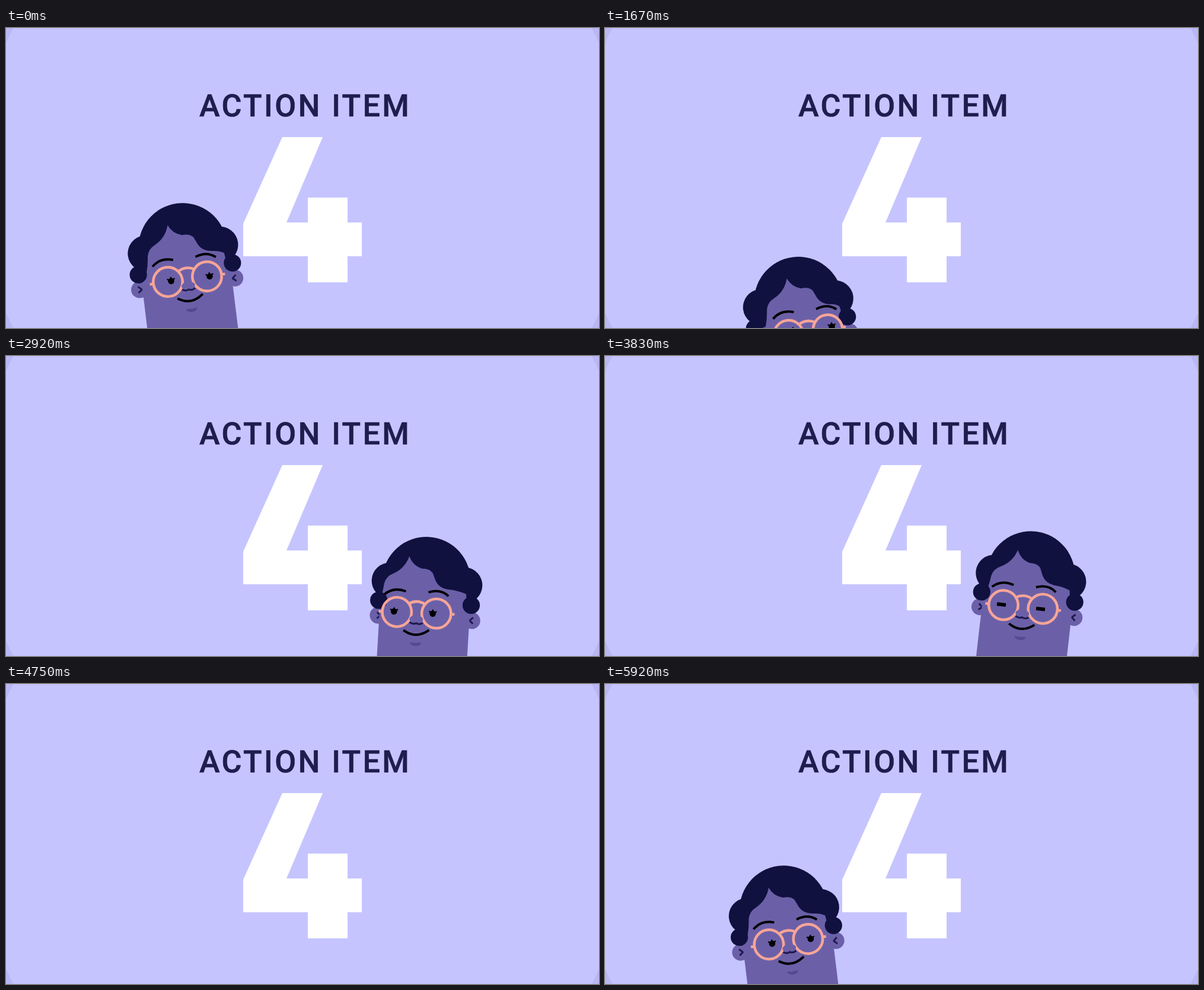
Write an HTML page that moves like this. It is 1000 px wide and 506 px high and loops after 6.01 s.

```html
<!DOCTYPE html>
<html lang="en">
<head>
<meta charset="utf-8">
<title>Action item 4</title>
<style>
  html, body { margin: 0; width: 100%; height: 100%; overflow: hidden; background: #bab8f3; }
  svg { display: block; width: 100vw; height: 100vh; }
  .title { font: 500 52px Roboto, sans-serif; letter-spacing: 3.4px; fill: #1f1d4e; stroke: #1f1d4e; stroke-width: .6; }
  .skin { fill: #6b60a8; }
  .hair { fill: #10113f; }
  .ink { fill: none; stroke: #000; stroke-width: 4; }
  .mark { fill: none; stroke: #1f1a50; stroke-width: 3; }
  .frame { fill: none; stroke: #f7a597; stroke-width: 4.5; }
</style>
</head>
<body>
<svg viewBox="0 0 1000 506">
  <circle cx="500" cy="253" r="549.3" fill="#c6c4ff"/>
  <text class="title" x="326" y="149">ACTION ITEM</text>
  <path role="img" aria-label="4" fill="#fff" d="M466 184H534L473 328H509V286H576V328H600V385H576V429H509V385H400V330Z"/>

  <g id="head">
    <g id="earL">
      <circle class="skin" cx="-81" cy="62.3" r="14.2"/>
      <path class="mark" d="M-83 57L-77 62.5L-83 67.5"/>
    </g>
    <g id="earR">
      <circle class="skin" cx="81" cy="62.3" r="14.2"/>
      <path class="mark" d="M83 57L77 62.5L83 67.5"/>
    </g>
    <g class="hair">
      <circle r="74.5"/>
      <g id="curls">
        <circle cx="-63" cy="3" r="30.5"/>
        <circle cx="63" cy="3.5" r="30.5"/>
      </g>
    </g>
    <path class="skin" d="M-76 37H76V330H-76Z"/>
    <path class="skin" id="forehead"/>
    <circle class="hair" id="bobL" cx="-80" cy="37" r="14.6"/>
    <circle class="hair" id="bobR" cx="80" cy="36.5" r="14.6"/>

    <g id="face">
      <path id="brows" class="ink" d="M-56 -28Q-41 -42 -20 -35M18 -35.5Q38 -43 52 -31"/>
      <g id="eyesOpen">
        <g id="eyeL"><circle r="5.3"/><path class="ink" style="stroke-width:2.2" d="M-6.5 -4L0 0L6.5 -4M0 0V-7"/></g>
        <g id="eyeR"><circle r="5.3"/><path class="ink" style="stroke-width:2.2" d="M-6.5 -4L0 0L6.5 -4M0 0V-7"/></g>
      </g>
      <path id="eyesShut" class="ink" style="stroke-width:6" d="M-40.7 0H-25.7M25.7 0H40.7"/>
      <g class="frame" transform="rotate(-1)">
        <circle cx="-33.3" r="24.7"/>
        <circle cx="33.3" r="24.7"/>
        <path d="M-14.5 -14.5Q0 -23.5 14.5 -14.5M-64 0H-58M58 0H64"/>
      </g>
      <ellipse class="skin" cy="11" rx="11.5" ry="6.5"/>
      <path class="mark" d="M-11 16.5Q-5 20.5 0 17.5Q6 20.5 11 16.5"/>
      <path id="mouth" class="ink"/>
      <path d="M-9 50Q1 51.5 11 49.5Q9 56 1 56Q-7 56 -9 50Z" fill="#544a92"/>
    </g>
  </g>
</svg>
<script>
const LOOP = 6010, STEP = 1000 / 12, LAST_STEP = 71;
const el = id => document.getElementById(id);
const move = (id, x, y = 0) => el(id).setAttribute('transform', `translate(${x} ${y})`);
const show = (id, on) => el(id).setAttribute('visibility', on ? 'inherit' : 'hidden');

// Smooth value through [time, value] keys.
function track(t, ...keys) {
  if (t <= keys[0][0]) return keys[0][1];
  for (let i = 1; i < keys.length; i++) {
    const [t0, a] = keys[i - 1], [t1, b] = keys[i];
    if (t <= t1) {
      const u = (t - t0) / (t1 - t0);
      return a + (b - a) * u * u * (3 - 2 * u);
    }
  }
  return keys.at(-1)[1];
}

const rise = (t, end) => 0.00117 * Math.max(0, end - t) ** 2;
const sink = (t, start, rate) => rate * Math.max(0, t - start) ** 3;

function leftPose(time) {
  const t = time > 5000 ? time - 6000 : time;
  const drop = rise(t, 14) * (t < 0) + sink(t, 1340, 2.6e-6);
  const look = track(t, [670, 0], [1250, 1]);
  return {
    x: 298 + 0.31 * drop, y: 369.7 + drop, angle: -7, swing: 0,
    turn: track(t, [0, 1.35], [670, 10]),
    gazeX: 5.5 + 3 * look, gazeY: -4.5 * look, look,
    shut: t > 495 && t < 660,
  };
}

function rightPose(t) {
  const enter = rise(t, 3010), leave = sink(t, 4403, 5.05e-6);
  const look = track(t, [3920, 0], [4400, 1]);
  const angle = 6.5;
  return {
    x: 718 - 0.14 * enter - 0.2 * leave, y: 370 + enter + leave, angle,
    swing: track(t, [2667, 2.4], [2917, 3.3], [3100, 6.8], [3250, 6.5]) - angle,
    turn: track(t, [3250, -13.4], [3920, -6.5]),
    gazeX: track(t, [3250, -5], [3920, -3.5], [4400, -6]), gazeY: -4 * look, look,
    shut: t > 3745 && t < 3910,
  };
}

function drawHead(p) {
  // Swinging pivots on the base of the neck.
  el('head').setAttribute('transform',
    `translate(${p.x} ${p.y}) rotate(${p.swing} -15 136) rotate(${p.angle})`);

  // Sides tuck inwards as the face turns away from the front.
  const side = (p.turn - 1.35) / 8.65, tuck = Math.abs(side);
  move('curls', -0.7 * side);
  move('bobL', tuck);
  move('bobR', -1.3 * tuck);
  move('earL', 1.2 * tuck - 0.6 * side);
  move('earR', -tuck - 0.6 * side);

  const s = 0.7 * (p.turn - 1.35), at = x => x + s;
  el('forehead').setAttribute('d',
    `M-70 46L${at(-66)} 36Q${at(-62)} 24 ${at(-60.5)} 8Q${at(-58)} -4 ${at(-46)} -9.5` +
    `Q${at(-27)} -19 ${at(-20.8)} -40Q${at(-14.5)} -25 ${at(1)} -20.5` +
    `Q${at(14)} -21.5 ${at(20)} -14.5Q${at(23)} -8 ${at(26)} -1` +
    `Q${at(32)} 10 ${at(46)} 12Q${60 + s / 2} 13 68 18L72 46Z`);

  move('face', p.turn, 54.4);
  move('brows', 0, -1.5 * p.look);
  move('eyeL', p.gazeX - 33.2, p.gazeY);
  move('eyeR', p.gazeX + 32.2, p.gazeY);
  move('eyesShut', p.gazeX);
  show('eyesOpen', !p.shut);
  show('eyesShut', p.shut);
  const k = p.look;
  el('mouth').setAttribute('d',
    `M${-20.5 + 6.5 * k} ${30.5 + 1.5 * k}Q1 ${45 + k} ${22.5 - 6 * k} ${28 + 2 * k}`);
}

function render(now) {
  const step = Math.min(LAST_STEP, Math.floor((now % LOOP + 3.5) / STEP));
  const t = step * STEP;
  const onLeft = t < 1830 || t > 5600, onRight = t > 2600 && t < 4745;
  show('head', onLeft || onRight);
  if (onLeft) drawHead(leftPose(t));
  else if (onRight) drawHead(rightPose(t));
}

const start = performance.now();
function tick() {
  render(performance.now() - start);
  requestAnimationFrame(tick);
}
tick();
</script>
</body>
</html>
```
